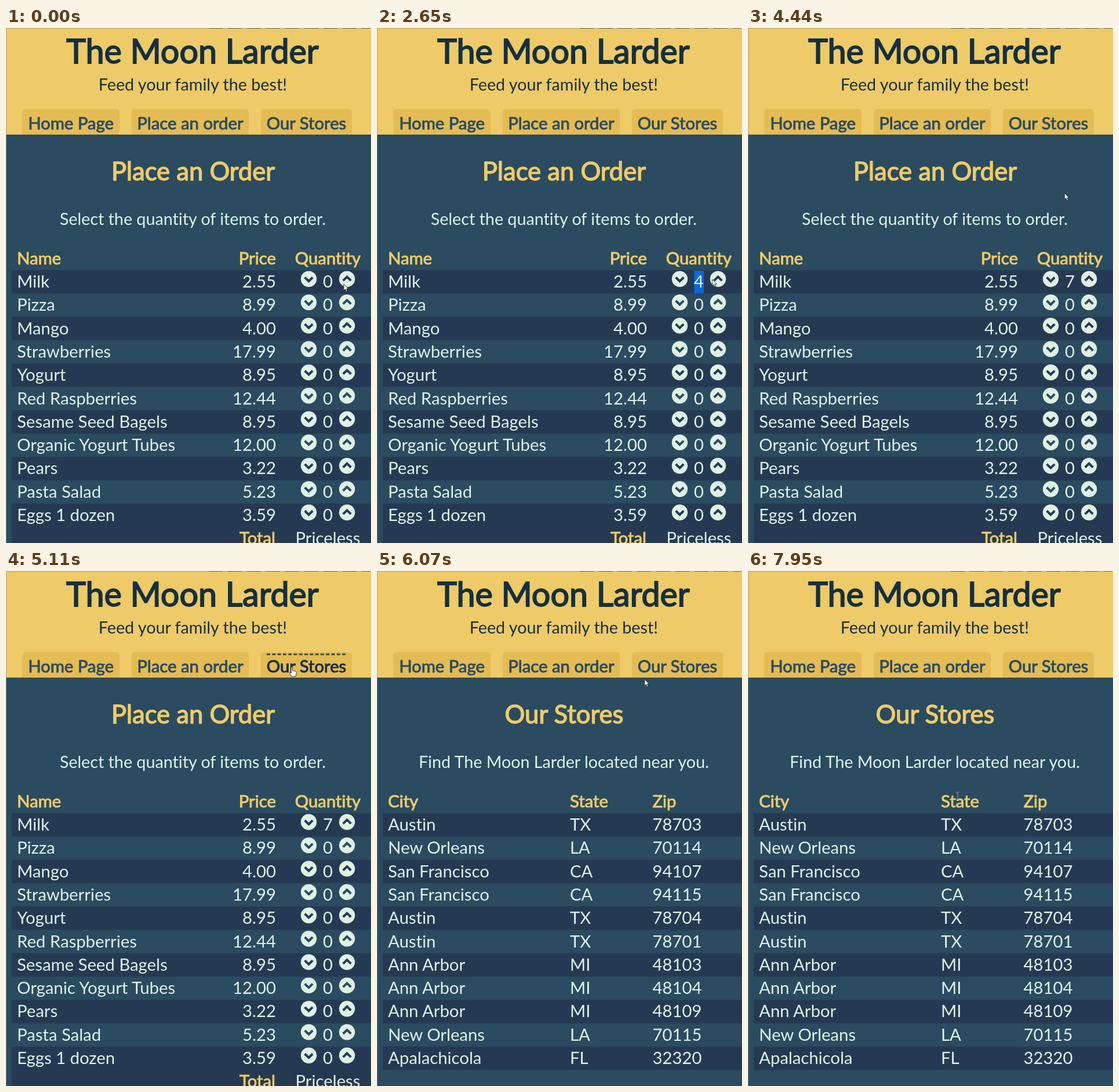
Animation, 630 px wide and 889 px high, one loop 8 s. Source, as an HTML page:

```html
<!DOCTYPE html>
<html lang="en">
<head>
<meta charset="utf-8">
<title>Grocery order page</title>
<style>
  html, body { margin: 0; width: 100%; height: 100%; overflow: hidden; background: #2a4b60; }
  svg { display: block; width: 100%; height: 100%; }
  text {
    font: 29.3px Lato, "Open Sans", sans-serif; font-variant-ligatures: none;
    fill: #e0f2e9; white-space: pre;
  }
  .intro { font-size: 28.7px; }
  .bold { stroke-width: 0.95; stroke-linejoin: round; }
  .gold { fill: #f0cb69; stroke: #f0cb69; }
  .ink { fill: #15303f; }
  .h1 { font-size: 57.4px; stroke: #15303f; stroke-width: 1.8; }
  .h2 { font-size: 43.6px; stroke-width: 1.4; }
  .tab { fill: #2a4c61; stroke: #2a4c61; }
  .tab.hover { fill: #15303f; stroke: #15303f; }
</style>
</head>
<body>
<svg id="stage" viewBox="0 0 630 889" preserveAspectRatio="none"></svg>
<script>
const LOOP = 8000, ROW = 40.3, TOP = 418, MID = 322.4;
const DARK = '#253a52', PAGE = '#2a4b60', MINT = '#e0f0e5';
const stage = document.getElementById('stage');

function add(parent, tag, attrs = {}, content) {
  const el = document.createElementNS('http://www.w3.org/2000/svg', tag);
  for (const key in attrs) el.setAttribute(key, attrs[key]);
  if (content !== undefined) el.textContent = content;
  parent.appendChild(el);
  return el;
}
const rect = (parent, x, y, width, height, fill) =>
  add(parent, 'rect', { x, y, width, height, fill });
const label = (parent, x, y, content, cls = '', anchor = 'start') =>
  add(parent, 'text', { x, y, class: cls, 'text-anchor': anchor }, content);
const show = (el, on) => el.setAttribute('display', on ? 'inline' : 'none');
const rowY = i => TOP + i * ROW;

// Page frame and header
rect(stage, 0, 0, 630, 889, PAGE);
rect(stage, 0, 0, 630, 184, '#eeca68');
label(stage, MID - 0.5, 61, 'The Moon Larder', 'h1 ink', 'middle');
label(stage, MID, 108, 'Feed your family the best!', 'intro ink', 'middle');

const tabs = [[28, 168, 'Home Page'], [217, 202, 'Place an order'], [440, 157, 'Our Stores']].map(([x, w, name]) => {
  add(stage, 'path', {
    d: `M${x} 184V146q0 -6 6 -6h${w - 12}q6 0 6 6V184z`, fill: '#e5bb54'
  });
  return label(stage, x + w / 2, 175, name, 'bold tab', 'middle');
});
const tabLine = add(stage, 'path', { d: 'M450 143.8H586', stroke: '#1f4357', 'stroke-width': 2.8 });

for (let i = 0; i < 11; i += 2) rect(stage, 10, rowY(i), 620, ROW, DARK);

function heading(page, title, intro) {
  label(page, MID + 0.5, 262.5, title, 'h2 gold', 'middle');
  label(page, MID, 340, intro, 'intro', 'middle');
}

function button(page, x, y, dir, color) {
  add(page, 'circle', { cx: x, cy: y, r: 13.7, fill: MINT });
  add(page, 'path', {
    d: `M${x - 6.8} ${y - 2.8 * dir}l6.8 ${6.6 * dir}l6.8 ${-6.6 * dir}`,
    fill: 'none', stroke: color, 'stroke-width': 4
  });
}

// Order page
const order = add(stage, 'g');
heading(order, 'Place an Order', 'Select the quantity of items to order.');
label(order, 19, 408, 'Name', 'bold gold');
label(order, 466, 408, 'Price', 'bold gold', 'end');
label(order, 555.5, 408, 'Quantity', 'bold gold', 'middle');
const selection = rect(order, 547.5, 419, 16.5, 39, '#0a68d8');
const counts = [
  'Milk,2.55', 'Pizza,8.99', 'Mango,4.00', 'Strawberries,17.99', 'Yogurt,8.95',
  'Red Raspberries,12.44', 'Sesame Seed Bagels,8.95', 'Organic Yogurt Tubes,12.00',
  'Pears,3.22', 'Pasta Salad,5.23', 'Eggs 1 dozen,3.59'
].map((line, i) => {
  const [name, price] = line.split(',');
  const y = rowY(i), color = i % 2 ? PAGE : DARK;
  label(order, 19, y + 30, name);
  label(order, 466, y + 30, price, '', 'end');
  button(order, 522.5, y + 15.3, 1, color);
  button(order, 588.6, y + 15.3, -1, color);
  return label(order, 555.5, y + 30, '0', '', 'middle');
});
rect(order, 10, rowY(11), 620, ROW, DARK);
label(order, 465, 891, 'Total', 'bold gold', 'end');
label(order, 555.5, 891, 'Priceless', '', 'middle');

// Stores page
const stores = add(stage, 'g');
heading(stores, 'Our Stores', 'Find The Moon Larder located near you.');
const columns = [19, 333, 475.5];
const cells = (line, y, cls) =>
  line.split(',').forEach((cell, c) => label(stores, columns[c], y, cell, cls));
cells('City,State,Zip', 408, 'bold gold');
[
  'Austin,TX,78703', 'New Orleans,LA,70114', 'San Francisco,CA,94107', 'San Francisco,CA,94115',
  'Austin,TX,78704', 'Austin,TX,78701', 'Ann Arbor,MI,48103', 'Ann Arbor,MI,48104',
  'Ann Arbor,MI,48109', 'New Orleans,LA,70115', 'Apalachicola,FL,32320'
].forEach((line, i) => cells(line, rowY(i) + 30));

// Window edges
rect(stage, 0, 0, 1, 889, 'rgba(125,135,140,.6)');
rect(stage, 0, 0, 630, 1, 'rgba(140,140,130,.6)');
add(stage, 'path', { d: 'M350 .4H628', stroke: '#4c4a42', 'stroke-width': 0.8, 'stroke-dasharray': '24 9' });

// Pointers, each with its hot spot at 0,0
const cursor = add(stage, 'g');
const edge = { fill: '#fff', stroke: '#1b2a36', 'stroke-width': 0.9, 'stroke-linejoin': 'round' };
const pointers = {
  arrow: add(cursor, 'path', { ...edge, d: 'M0 0V11L2.5 8.7L4.4 12.8L6.2 12L4.4 8H7.8Z' }),
  hand: add(cursor, 'path', { ...edge, d: 'M-1.4 1Q0 -1 1.2 1V6L6 7Q8 7 7.8 11L6.4 16H-.4L-4 10Q-4 8 -1.4 10Z' }),
  beam: add(cursor, 'path', {
    d: 'M-2.6 -6H2.6M0 -6V6M-2.6 6H2.6', fill: 'none', stroke: '#8b979b', 'stroke-width': 1.1
  })
};

// The screen is sampled every STEP ms; each move eases from the last stop
const STEP = 136;
const home = { x: 583, y: 442 };
const moves = [
  { from: 150, to: 290, x: 583, y: 437 },
  { from: 700, to: 850, x: 581.5, y: 437 },
  { from: 1150, to: 1420, x: 578.8, y: 434 },
  { from: 3740, to: 4020, x: 584, y: 370 },
  { from: 4290, to: 5110, x: 493.5, y: 166 },
  { from: 5800, to: 6610, x: 440, y: 201.5 },
  { from: 7000, to: 7950, x: 362, y: 388 }
];
const ease = p => 1 - (1 - p) ** 1.6;

function pointerAt(t) {
  let { x, y } = home;
  for (const m of moves) {
    if (t < m.from) break;
    const gaps = Math.round((m.to - m.from) / STEP);
    const done = Math.min(gaps, Math.floor((t - m.from) / (m.to - m.from) * gaps)) + 1;
    const p = ease(done / (gaps + 1));
    x += (m.x - x) * p;
    y += (m.y - y) * p;
  }
  return { x, y };
}

function shapeAt({ x, y }) {
  if (y < 184 && x > 440 && x < 597) return 'hand';
  const onHeader = Math.abs(y - 399) < 14;
  const onIntro = Math.abs(y - 331) < 12 && x < 552;
  return onHeader || onIntro ? 'beam' : 'arrow';
}

// Seven even clicks; the second one selects the number
const CLICK = 1980, BEAT = 223, CLICKS = 7, DESELECT = 4020, SWITCH = 5250;

function render(t) {
  const at = pointerAt(t), shape = shapeAt(at);
  cursor.setAttribute('transform', `translate(${at.x} ${at.y})`);
  for (const name in pointers) show(pointers[name], name === shape);

  const count = Math.floor((t - CLICK) / BEAT) + 1;
  counts[0].textContent = Math.max(0, Math.min(CLICKS, count));
  show(selection, count > 1 && t < DESELECT);

  const hover = shape === 'hand';
  tabs[2].classList.toggle('hover', hover);
  show(tabLine, hover);
  tabLine.setAttribute('stroke-dasharray', t < SWITCH ? '5.9 3.4' : 'none');

  show(order, t < SWITCH);
  show(stores, t >= SWITCH);
}

const start = performance.now();
function tick() {
  render((performance.now() - start) % LOOP);
  requestAnimationFrame(tick);
}
tick();
</script>
</body>
</html>
```
